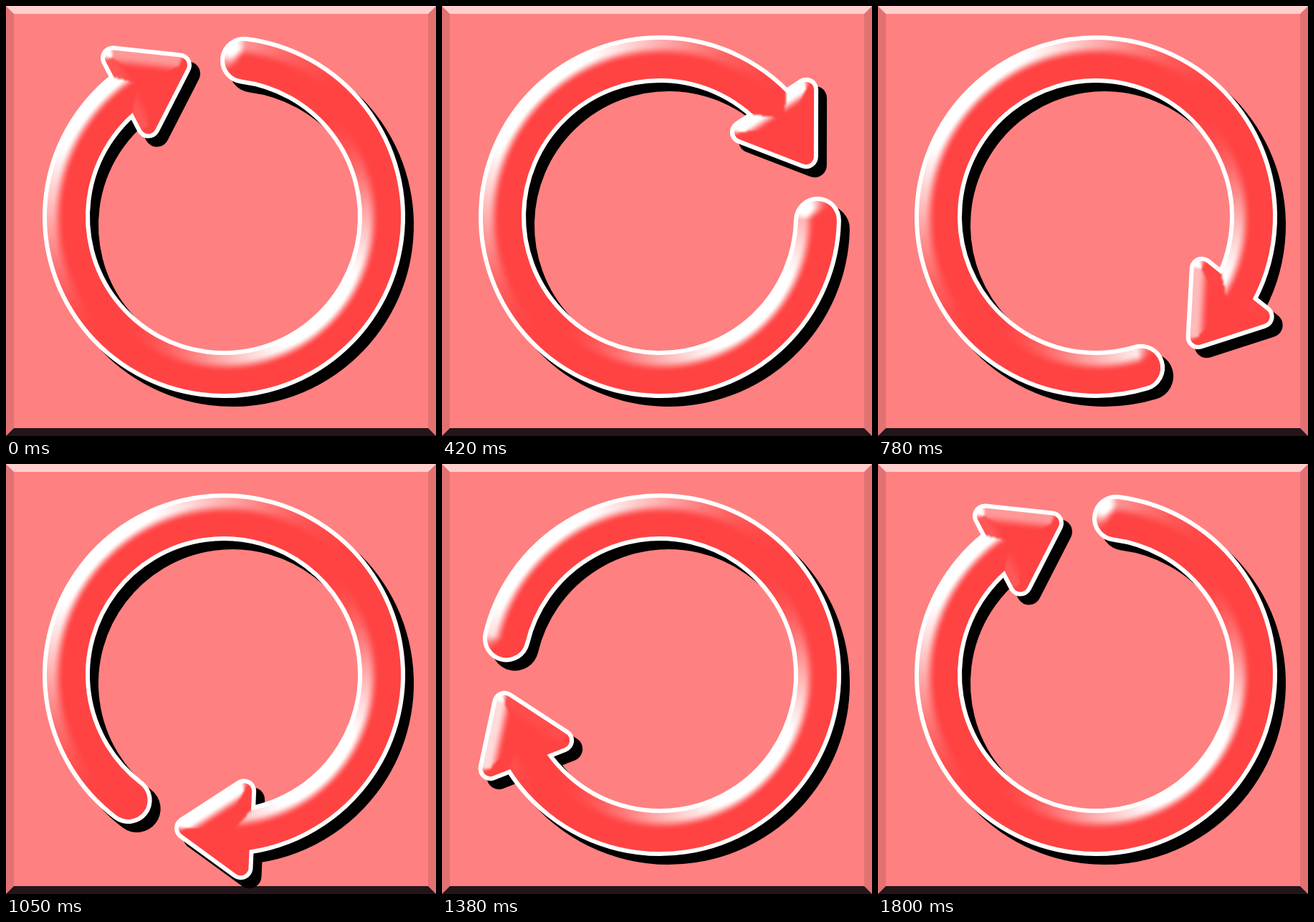
Recreate the animation shown at these times as an HTML page with a canvas. Size 600x600 px, loop 1.83 s.

```html
<!DOCTYPE html>
<html lang="en">
<head>
<meta charset="utf-8">
<title>Turning arrow</title>
<style>
  html, body { margin: 0; width: 100%; height: 100%; overflow: hidden; background: #ff8080; }
  canvas { display: block; width: 600px; height: 600px; }
</style>
</head>
<body>
<canvas id="stage" width="600" height="600"></canvas>
<script>
const SIZE = 600, CX = 304, CY = 294, RADIUS = 220;
const HALF = 27, CORNER = 11, RIM = 6;
const STEP = 30, STEPS = 61, TURN = 6;
const rad = deg => deg * Math.PI / 180;
const TAIL = rad(7.3), NECK = rad(328);

// corners of the head, relative to the ring centre: back outside, tip, back inside
const HEAD = [[-155, -221.5], [-62, -211.5], [-105.5, -126.5]];
const EDGES = HEAD.map(([x, y], i) => {
  const [x2, y2] = HEAD[(i + 1) % 3];
  const len = Math.hypot(x2 - x, y2 - y);
  const ux = (x2 - x) / len, uy = (y2 - y) / len;
  return { x, y, ux, uy, nx: uy, ny: -ux, len };
});
const CAP = [RADIUS * Math.sin(TAIL), -RADIUS * Math.cos(TAIL)];

function makeCanvas(size) {
  const c = document.createElement('canvas');
  c.width = c.height = size;
  return c.getContext('2d');
}

const ctx = document.getElementById('stage').getContext('2d');
const layer = makeCanvas(SIZE);
const GRID = SIZE / 2;
const gloss = makeCanvas(GRID);
const glossData = gloss.createImageData(GRID, GRID);
glossData.data.fill(255);

function quad(color, ...pts) {
  ctx.fillStyle = color;
  ctx.beginPath();
  pts.forEach(([x, y]) => ctx.lineTo(x, y));
  ctx.fill();
}

function drawPanel() {
  const a = 11, b = SIZE - 11, s = SIZE;
  ctx.fillStyle = '#ff8080';
  ctx.fillRect(0, 0, s, s);
  quad('#e27272', [0, 0], [a, a], [a, b], [0, s]);
  quad('#e27272', [s, 0], [b, a], [b, b], [s, s]);
  quad('#ffcfcf', [0, 0], [s, 0], [b, a], [a, a]);
  quad('#23151a', [0, s], [s, s], [b, b], [a, b]);
}

function drawArrow(g, color, grow) {
  g.strokeStyle = g.fillStyle = color;
  g.lineCap = g.lineJoin = 'round';
  g.lineWidth = 2 * (HALF + grow);
  g.beginPath();
  g.arc(0, 0, RADIUS, TAIL - Math.PI / 2, NECK - Math.PI / 2);
  g.stroke();
  g.lineWidth = 2 * (CORNER + grow);
  g.beginPath();
  HEAD.forEach(([x, y]) => g.lineTo(x, y));
  g.closePath();
  g.fill();
  g.stroke();
}

// each returns [depth below the surface edge, outward normal x, y]
function headDepth(x, y) {
  let inside = true, best = Infinity, nx = 0, ny = 0;
  for (const e of EDGES) {
    const dx = x - e.x, dy = y - e.y;
    const out = dx * e.nx + dy * e.ny;
    if (out > 0) inside = false;
    if (-out < best) { best = -out; nx = e.nx; ny = e.ny; }
  }
  if (inside) return [CORNER + best, nx, ny];
  best = Infinity;
  for (const e of EDGES) {
    const dx = x - e.x, dy = y - e.y;
    const t = Math.max(0, Math.min(e.len, dx * e.ux + dy * e.uy));
    const vx = dx - t * e.ux, vy = dy - t * e.uy, d = Math.hypot(vx, vy);
    if (d < best) { best = d; nx = vx / d; ny = vy / d; }
  }
  return [CORNER - best, nx, ny];
}

function ringDepth(x, y, r) {
  const a = (Math.atan2(x, -y) + 2 * Math.PI) % (2 * Math.PI);
  if (a >= TAIL && a <= NECK) {
    const side = r > RADIUS ? 1 : -1;
    return [HALF - Math.abs(r - RADIUS), side * x / r, side * y / r];
  }
  const dx = x - CAP[0], dy = y - CAP[1], d = Math.hypot(dx, dy) || 1;
  return [HALF - d, dx / d, dy / d];
}

function drawGloss(turn) {
  const cos = Math.cos(turn), sin = Math.sin(turn);
  const lx = -Math.SQRT1_2 * (cos + sin), ly = Math.SQRT1_2 * (sin - cos);
  const px = glossData.data;
  for (let j = 0, k = 3; j < GRID; j++) {
    for (let i = 0; i < GRID; i++, k += 4) {
      px[k] = 0;
      const sx = 2 * i + 1 - CX, sy = 2 * j + 1 - CY;
      const r = Math.hypot(sx, sy);
      if (r < 140 || r > 295) continue;
      const x = sx * cos + sy * sin, y = sy * cos - sx * sin;
      const ring = ringDepth(x, y, r);
      const head = x < -20 && y < -90 ? headDepth(x, y) : ring;
      const [depth, nx, ny] = head[0] > ring[0] ? head : ring;
      const lit = nx * lx + ny * ly;
      if (depth < -RIM || lit <= 0) continue;
      const t = Math.max(0, Math.min(1, (depth - 7) / 17));
      const fade = 1 - t * t * (3 - 2 * t);
      px[k] = 255 * Math.min(1, 1.15 * lit * lit * fade);
    }
  }
  gloss.putImageData(glossData, 0, 0);
}

function render(step) {
  const turn = rad(step * TURN);
  layer.clearRect(0, 0, SIZE, SIZE);
  layer.save();
  layer.translate(CX, CY);
  layer.rotate(turn);
  drawArrow(layer, '#ffffff', RIM);
  drawArrow(layer, '#ff4343', 0);
  layer.restore();

  drawGloss(turn);
  layer.save();
  layer.globalCompositeOperation = 'source-atop';
  layer.filter = 'blur(1.3px)';
  layer.drawImage(gloss.canvas, 0, 0, SIZE, SIZE);
  layer.restore();

  drawPanel();
  ctx.save();
  ctx.shadowColor = '#000';
  ctx.shadowOffsetX = ctx.shadowOffsetY = 12;
  ctx.shadowBlur = 1;
  ctx.drawImage(layer.canvas, 0, 0);
  ctx.restore();
}

const start = performance.now();
let shown = -1;
function tick() {
  const step = Math.floor((performance.now() - start) / STEP) % STEPS;
  if (step !== shown) render(shown = step);
  requestAnimationFrame(tick);
}
tick();
</script>
</body>
</html>
```
